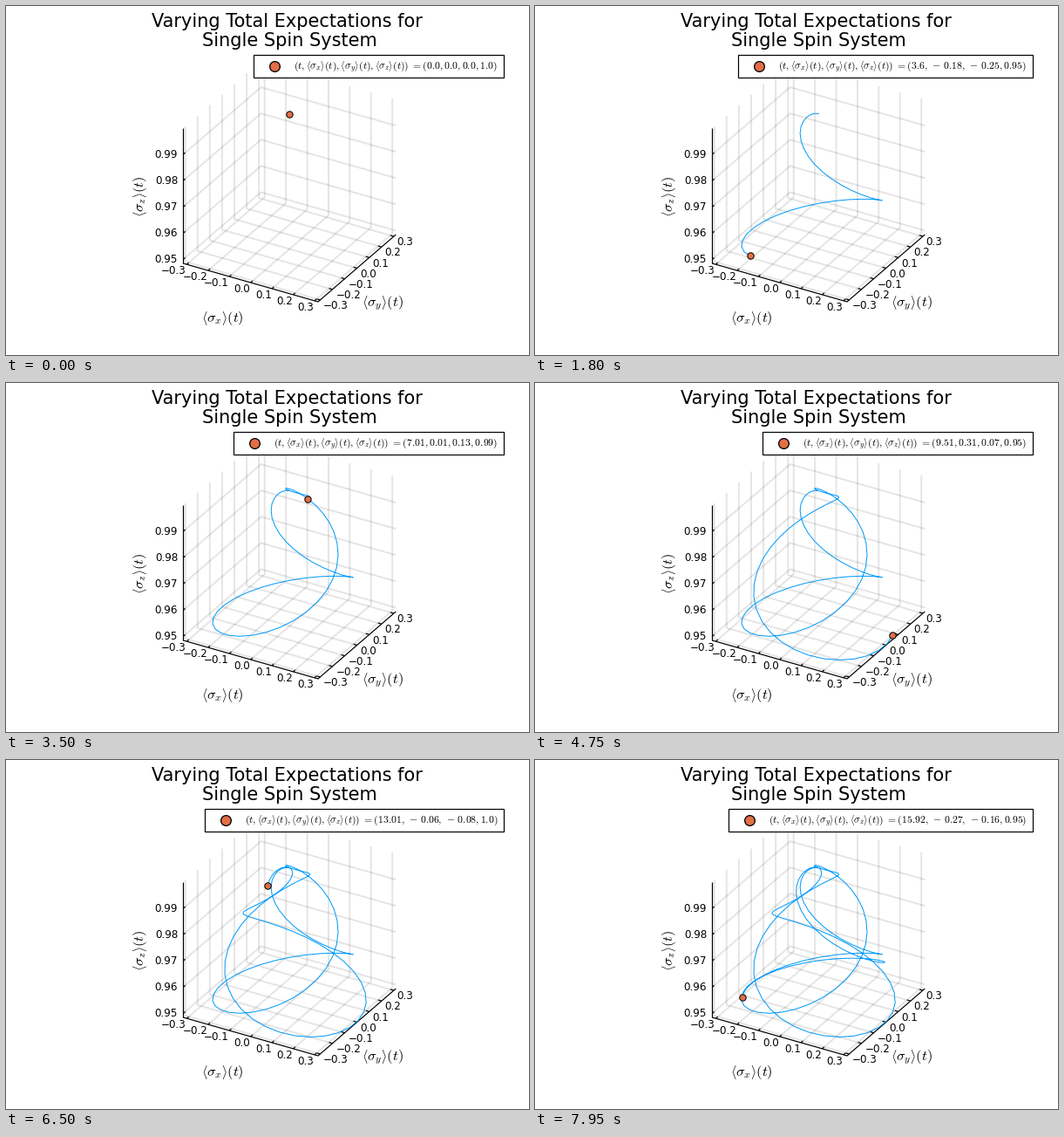
Animation of 600 by 400 pixels, one loop 8 s. Source, as a matplotlib script:

```python
import numpy as np
import matplotlib
import matplotlib.pyplot as plt
from matplotlib.animation import FuncAnimation
from matplotlib.patches import Rectangle

matplotlib.rcParams["font.family"] = "DejaVu Sans"
matplotlib.rcParams["mathtext.fontset"] = "cm"

W, H, DPI = 600, 400, 100
PX = 72 / DPI              # points per pixel
FRAMES, INTERVAL = 160, 50
BLUE, ORANGE = "#009afa", "#e26f46"
TITLE, GUIDE, TICK, NOTE = 20.85, 16.4, 11.9, 11.73   # text sizes in pixels

# Spin in a static field along z plus a weak rotating transverse field
DT = 100 / 999
DRIVE = 1.5                # rotation rate of the transverse field
RABI = 1.014               # precession rate in the rotating frame
SIN = 0.1605               # sine of the tilt of the effective field
COS = np.sqrt(1 - SIN ** 2)
PHASE = -0.004

R_MAX = 2 * SIN * COS      # half range of the x and y axes
Z_MIN = 1 - 2 * SIN ** 2   # bottom of the z axis

ORIGIN = np.array([203.3, 295.0])
EX = np.array([154.7, 44.0])
EY = np.array([89.3, -77.0])
EZ = np.array([0.0, -155.0])


def spin(t):
    phi = RABI * t
    u = -SIN * np.sin(phi) - 1j * SIN * COS * (1 - np.cos(phi))
    u = u * np.exp(1j * (DRIVE * t + PHASE))
    u[0] = 0
    return u.real, u.imag, COS ** 2 + SIN ** 2 * np.cos(phi)


def unit(v):
    return (v + R_MAX) / (2 * R_MAX)


def unit_z(z):
    return (z - Z_MIN) / (1 - Z_MIN)


def box(a, b, c):
    """Screen position of a point given in fractions of the axis box."""
    return ORIGIN + a * EX + b * EY + c * EZ


fig = plt.figure(figsize=(W / DPI, H / DPI), dpi=DPI, facecolor="white")
ax = fig.add_axes([0, 0, 1, 1])
ax.set_xlim(0, W)
ax.set_ylim(H, 0)
ax.axis("off")


def stroke(*pts, width=1.2, color="black", alpha=1.0, z=2):
    xs, ys = zip(*pts)
    ax.plot(xs, ys, color=color, lw=width * PX, alpha=alpha, zorder=z,
            solid_capstyle="butt", solid_joinstyle="miter")


def label(x, y, s, px, ha="center", va="baseline", **kw):
    return ax.text(x, y, s, fontsize=px * PX, ha=ha, va=va, zorder=3, **kw)


def grid(*pts):
    stroke(*pts, width=2, alpha=0.1, z=1)


def tick_text(v, digits):
    return f"{v:.{digits}f}".replace("-", "\u2212")


def draw_axes():
    for k in range(-3, 4):
        v = k / 10
        f = unit(v)
        grid(box(f, 0, 0), box(f, 1, 0), box(f, 1, 1))
        grid(box(1, f, 0), box(0, f, 0), box(0, f, 1))
        stroke(box(f, 0, 0), box(f, 0.025, 0))
        stroke(box(1, f, 0), box(0.975, f, 0))
        x, y = box(f, 0, 0)
        label(x - 0.4, y + 11, tick_text(v, 1), TICK, ha="right")
        x, y = box(1, f, 0)
        label(x + 3.8, y + 10.2, tick_text(v, 1), TICK, ha="left")
    for k in range(95, 100):
        f = unit_z(k / 100)
        grid(box(0, 0, f), box(0, 1, f), box(1, 1, f))
        stroke(box(0, 0, f), box(0, 0.025, f))
        x, y = box(0, 0, f)
        label(x - 6.3, y + 4, tick_text(k / 100, 2), TICK, ha="right")
    stroke(box(0, 0, 1), box(0, 0, 0))
    stroke(box(0, 0, 0), box(1, 0, 0), box(1, 1, 0))


def sigma(axis):
    # h and i of the calligraphic font are the small angle brackets
    return rf"\mathcal{{h}}\sigma_{axis}\mathcal{{i}}(t)"


draw_axes()
label(167, 24, "Varying Total Expectations for", TITLE, ha="left")
label(225, 46.5, "Single Spin System", TITLE, ha="left")
label(248.5, 358, f"${sigma('x')}$", GUIDE, va="center")
label(432, 341, f"${sigma('y')}$", GUIDE, va="center")
label(154, 218.5, f"${sigma('z')}$", GUIDE, va="center", rotation=90)

path, = ax.plot([], [], color=BLUE, lw=PX, zorder=4)
dot, = ax.plot([], [], "o", ms=7.4 * PX, mfc=ORANGE, mec="black",
               mew=1 * PX, zorder=5)

# Legend grows to the left from a fixed right edge
RIGHT, TOP, BOTTOM = 570.5, 56, 82
frame_box = Rectangle((0, TOP), 1, BOTTOM - TOP, fc="white", ec="black",
                      lw=1.2 * PX, zorder=6)
ax.add_patch(frame_box)
key, = ax.plot([], [], "o", ms=11.7 * PX, mfc=ORANGE, mec="black",
               mew=1.3 * PX, zorder=7)
note = label(RIGHT - 6.5, 72.5, "", NOTE, ha="right")
note.set_zorder(7)

times = np.arange(FRAMES) * DT
xs, ys, zs = spin(times)
pts = (ORIGIN[:, None] + np.outer(EX, unit(xs)) + np.outer(EY, unit(ys))
       + np.outer(EZ, unit_z(zs)))
HEAD = "(t," + ",".join(sigma(a) for a in "xyz") + r")\ ="


def update(i):
    path.set_data(pts[0, :i + 1], pts[1, :i + 1])
    dot.set_data([pts[0, i]], [pts[1, i]])
    values = (times[i], xs[i], ys[i], zs[i])
    nums = ",".join(str(round(float(v), 2)) for v in values)
    nums = nums.replace("-", r"\,-\,")
    note.set_text(f"${HEAD}({nums})$")
    width = note.get_window_extent(fig.canvas.get_renderer()).width * W / fig.bbox.width
    left = RIGHT - 52.5 - width
    frame_box.set_x(left)
    frame_box.set_width(RIGHT - left)
    key.set_data([left + 24], [69])
    return path, dot, frame_box, key, note


anim = FuncAnimation(fig, update, frames=FRAMES, interval=INTERVAL,
                     repeat=True, repeat_delay=0, blit=False)
plt.show()
```
